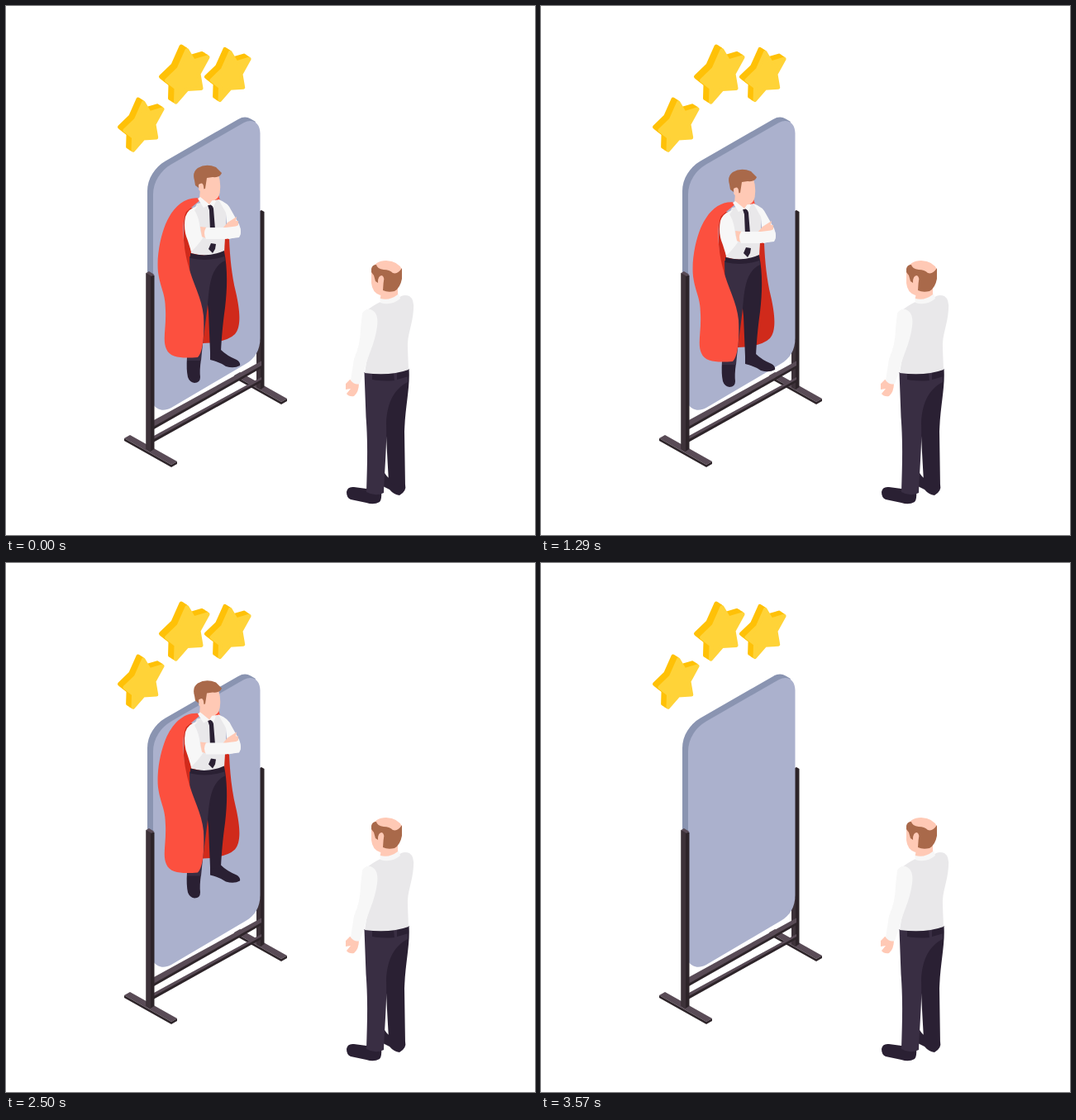
Animation of 640x640 px, one loop 5.87 s. Source, as an HTML page:

```html
<!DOCTYPE html>
<html lang="en">
<head>
<meta charset="utf-8">
<title>Hero in the mirror</title>
<style>
  html, body { margin: 0; width: 100%; height: 100%; overflow: hidden; background: #fff; }
  svg { display: block; width: 100%; height: 100%; }
  .skin { fill: #ffc9b5; }
  .hair { fill: #a9694a; }
  .white { fill: #f7f7f7; }
  .shirt { fill: #e9e8ea; }
  .navy { fill: #392e43; }
  .dark { fill: #2a2033; }
  .red { fill: #fc503f; }
  .crimson { fill: #d02a1b; }
  .steel { fill: #594b56; }
  .iron { fill: #2d2429; }
  .post { fill: #3d3239; }
  .side { fill: #ffc107; stroke: #ffc107; }
  .front { fill: #ffd338; stroke: #ffd338; }
  .side, .front { stroke-width: 5; stroke-linejoin: round; }
</style>
</head>
<body>
<svg viewBox="0 0 640 640">
  <defs>
    <path id="face" d="M219 53.5 L227 67 L244 62 L233 82 L236 99.5 L219 100.5 L205.5 116 L206 99 L194.5 90 L209 76Z"/>
    <g id="star">
      <g class="side">
        <use href="#face" x="-7" y="-4.5"/>
        <use href="#face" x="-5.2" y="-3.4"/>
        <use href="#face" x="-3.5" y="-2.2"/>
        <use href="#face" x="-1.7" y="-1.1"/>
      </g>
      <use href="#face" class="front"/>
    </g>
    <g id="foot">
      <path class="steel" d="M143 523 L150 519 L207 551 L200 555Z"/>
      <path class="iron" d="M143 523 L200 555 L207 551 V554 L200 558 L143 526Z"/>
    </g>
  </defs>

  <use href="#star"/>
  <use href="#star" transform="translate(69.8 7) scale(.92)"/>
  <use href="#star" transform="translate(-35.2 67.7) scale(.92)"/>

  <g id="mirror">
    <use href="#foot" x="133" y="-76"/>
    <path class="iron" d="M303 405 L307 248 L309 247 L312.5 249 V461 L308 464 L303 461Z"/>
    <path class="post" d="M303 405 H308 V464 L303 461Z"/>
    <path fill="#8a94b1" d="M171 330 V224 C171 209 180 195 193 187.5 L281 137 Q289 132.500 296 136.500 L302 140 L290 160 L190 330Z"/>
    <path fill="#abb1cd" d="M178 482 V228 C178 213 187 199 200 191.500 L288 141 C298 135.500 307.500 141 307.500 154 V402 C307.500 416 301 427 290 433 L200 486 C191 491 183 489 178 482Z"/>
    <path class="steel" d="M179 501 L309 429.500 V436 L179 509Z"/>
    <path class="iron" d="M179 508.500 L309 435 V438 L179 512Z"/>
    <path class="steel" d="M179 520 L309 449 V453 L179 525Z"/>
    <path class="iron" d="M179 524 L309 452 V455 L179 527.500Z"/>
    <use href="#foot"/>
    <path class="iron" d="M169.500 323 L179.500 326 V536 L174.500 539 L169.500 536Z"/>
    <path class="post" d="M169.500 323 L175 326 V538.500 L169.500 536Z"/>
    <path class="steel" d="M169.500 323 L173 321 L179.500 325 L176 327Z"/>
  </g>

  <g id="viewer">
    <path class="dark" d="M457 563 Q463 576 483 579 Q485 587 476 592 Q469 591 464 585 L456 581Z"/>
    <path class="dark" d="M412 588 Q413 581 421 582 L436 584 L454 586 Q455 597 452 600 Q445 604 436 601 L417 597 Q412 595 412 588Z"/>
    <path class="dark" d="M460 443 L487.500 439 C489 462 483 484 482 515 L483 582 Q474 583 463 576 L461 540 L459 500Z"/>
    <path class="navy" d="M433.500 443 L485 441 L486 455 C468 464 461 482 460 505 C461 530 458 562 457 589 Q447 594 436 588 C437 555 438 530 435.500 497Z"/>
    <path class="dark" d="M434 443 L487 440 V448 L470 453 Q453 455 434 450Z"/>
    <path class="navy" d="M434 443 H443 V453 L434 450Z M469 444 L473 443 V453 L470 454Z"/>
    <path class="skin" d="M411 457 L416 452 L427 456 Q427 467 421 472 Q415 473 412 469 L417 463 L411 464Z"/>
    <path class="shirt" d="M437 368 Q447 360 456 357 L474 354 Q480 348 488 351 Q494 355 493 367 C492 386 485 397 486 415 L487 440 Q465 448 434 444 L437 425Z"/>
    <path class="white" d="M452 352 Q463 357 475 348 L477 354 Q466 363 453 359Z"/>
    <path class="white" d="M431 372 Q436 364 443 368 Q451 372 449 388 C446 410 437 424 434 440 L428 457 Q422 459 417 453 L421 427 Q429 409 429 390Z"/>
    <path class="skin" d="M454 340 L474 337 L474 349 Q464 357 453 354Z"/>
    <path class="skin" d="M442 320 Q446 308 460 308 Q475 309 479 319 L474 335 L459 346 L453 350 Q443 347 442 335Z"/>
    <path class="hair" d="M442 318 Q443 313 448 313 Q449 318 457 319 Q464 319 468 323 Q474 325 479 317 V330 Q477 341 470 345 Q462 347 456 344 L457 330 Q455 325 452 330 L450 335 L447 333 L445 326 L442 322Z"/>
    <path class="skin" d="M450 334 Q450 326 455 326 Q459 329 456 335 L453 342Z"/>
  </g>

  <g id="hero">
    <path class="crimson" d="M216 243 L262 250 L270 282 C271 305 273 325 278 346 C284 372 284 389 277 397 Q267 407 238 408 L222 330 Q212 300 216 243Z"/>
    <path class="dark" d="M219 425 L236 427 Q234 441 235 449 Q235 456 228 456 Q222 455 220 449 Q218 440 219 425Z"/>
    <path class="dark" d="M247 415 L260 416 Q267 423 279 428 Q284 431 283 435 Q276 439 266 436 Q259 431 247 428Z"/>
    <path class="dark" d="M237 302 L264 297 C268 316 268 340 265 365 C262 387 261 400 260 418 Q253 422 247 419 L245 370Z"/>
    <path class="navy" d="M222 303 L264 301 L265 308 C250 315 247 332 245 350 C243 374 239 397 236 429 L219 429 Q224 380 222 303Z"/>
    <path class="red" d="M237 233 C217 229 202 243 193 264 C187 279 182 302 184 322 C187 343 193 347 193 368 C194 390 189 404 194 415 C199 427 216 426 232 425 C239 418 240 395 239 375 C237 353 226 336 220 312 C214 289 212 261 218 249Z"/>
    <path class="red" d="M251 230 L257 228 L259 235 L252 238Z"/>
    <path class="shirt" d="M231 239 L258 234 L267 247 L264 298 Q244 305 224 299 L221 260Z"/>
    <path class="dark" d="M223 299 Q244 305 264 296 V303 Q244 310 223 305Z"/>
    <path class="white" d="M257 234 Q269 238 273 248 L282 264 Q286 274 282 279 L269 282 L266 250Z"/>
    <path class="white" d="M232 242 Q220 245 217 255 Q214 270 220 284 L224 297 Q231 291 238 281 L235 272 Q234 256 228 247Z"/>
    <path class="dark" d="M244 241 L249 240 L251 245 L253 270 L247 272 L246 247Z"/>
    <path class="dark" d="M248 287 L254 288 L253 294 L250 299 L245 294Z"/>
    <path class="skin" d="M235 267 L244 268 L242 281 L237 279Z"/>
    <path class="skin" d="M262 269 L268 262 L279 255 L278 260 L281 260 L281 265 L273 270Z"/>
    <path class="white" d="M242 268 L266 268 L282 266 Q286 274 282 280 L265 282 L242 282 Q238 275 242 268Z"/>
    <path class="skin" d="M235 220 L251 228 L251 238 L246 241 L234 235Z"/>
    <path class="white" d="M232 233 L235 231 L246 240 L251 233 L254 236 L251 243 L247 240 L239 244Z"/>
    <path class="skin" d="M238 208 L257 204 Q260 214 259 222 Q259 232 252 235 Q247 236 241 231 L233 222Z"/>
    <path class="hair" d="M228 211 Q225 201 232 196 Q242 190 254 195 L261 202 Q259 208 250 207 L243 208 L241 221 L237 222 Q237 214 233 217 L233 220 L229 217Z"/>
    <path class="skin" d="M233 216 Q238 212 239 218 L240 226 Q233 224 233 216Z"/>
  </g>
</svg>
<script>
  const LOOP = 5870, FPS = 14, LAST = 50;
  // [step, vertical offset]: a bob up, a dip, then the flight off the stage
  const keys = [
    [0, 0], [10.3, -22], [13, -18.5], [18, 5], [22, 28.5], [23.2, 30], [27, 8.5], [31, 0],
    [33, -14], [35, -50.5], [36, -77], [42, -248.5], [45, -355], [49, -450], [50, -470]
  ];
  const hero = document.getElementById('hero');

  const slope = i => (keys[i + 1][1] - keys[i][1]) / (keys[i + 1][0] - keys[i][0]);

  // Harmonic mean of neighbouring slopes keeps the curve free of overshoot.
  const tangents = keys.map((_, i) => {
    if (i === 0 || i === keys.length - 1) return 0;
    const a = slope(i - 1), b = slope(i);
    return a * b > 0 ? 2 * a * b / (a + b) : 0;
  });

  function offsetAt(step) {
    let i = 0;
    while (i < keys.length - 2 && step >= keys[i + 1][0]) i++;
    const [x0, y0] = keys[i], [x1, y1] = keys[i + 1];
    const h = x1 - x0, u = (step - x0) / h, v = 1 - u;
    return y0 * v * v * (1 + 2 * u) + y1 * u * u * (3 - 2 * u)
      + h * u * v * (tangents[i] * v - tangents[i + 1] * u);
  }

  function draw() {
    const time = performance.now() % LOOP;
    const step = Math.min(LAST, Math.floor((time + 5) * FPS / 1000));
    hero.setAttribute('transform', `translate(0 ${offsetAt(step).toFixed(2)})`);
    requestAnimationFrame(draw);
  }
  draw();
</script>
</body>
</html>
```
